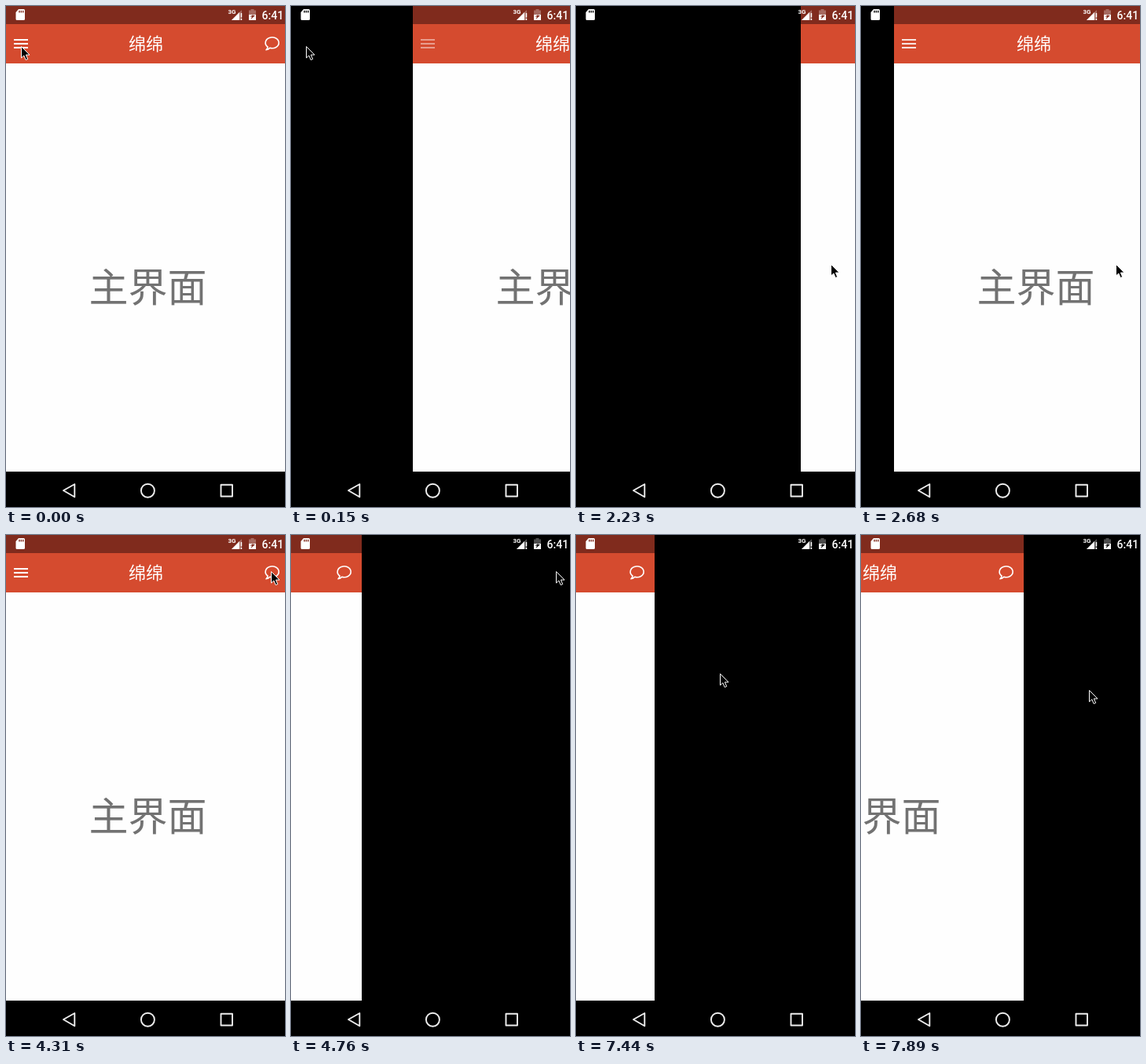
An HTML page for the animation above (8 s loop, 355 by 637 pixels).

```html
<!DOCTYPE html>
<html lang="zh-CN">
<head>
<meta charset="utf-8">
<title>Sliding panels</title>
<style>
  html, body { margin: 0; width: 100%; height: 100%; overflow: hidden; background: #000; }
  svg { display: block; width: 100vw; height: 100vh; }
  .cjk { font-family: "Noto Sans CJK SC", "Noto Sans CJK", sans-serif; text-anchor: middle; }
  .ui { font-family: Roboto, sans-serif; }
</style>
</head>
<body>
<svg viewBox="0 0 355 637">
  <rect width="355" height="637" fill="#000"/>

  <g id="page">
    <rect width="361" height="592" fill="#fefefe"/>
    <rect width="361" height="23" fill="#802b1d"/>
    <rect y="23" width="361" height="50" fill="#d54b2f"/>
    <path id="menu" d="M10 43H28M10 48H28M10 53H28" stroke="#fff" stroke-width="2"/>
    <text class="cjk" x="178" y="56" font-size="22" fill="#fff">绵绵</text>
    <g fill="none" stroke="#fff" stroke-width="1.6" stroke-linejoin="round">
      <path d="M333 52A8.500 7 0 1 1 335.600 53.300Q334 55.500 331 55.800Q332.800 54.500 333 52Z"/>
    </g>
    <text class="cjk" x="180.500" y="375.500" font-size="50" fill="#727272">主界面</text>
  </g>

  <g fill="#fff">
    <path fill-rule="evenodd" d="M16 4H22.500Q24 4 24 5.500V16.500Q24 18 22.500 18H14Q12.500 18 12.500 16.500V8ZM16.300 5.800V8.600H17.700V5.800ZM18.700 5.800V8.600H20.100V5.800ZM21.100 5.800V8.600H22.500V5.800Z"/>
    <text class="ui" x="282.500" y="10.200" font-size="8" font-weight="700">3G</text>
    <path d="M300 5V18H287Z" opacity=".3"/>
    <path d="M297 8V18H287Z"/>
    <path d="M298.700 9H300.200V14.500H298.700ZM298.700 16H300.200V18H298.700Z"/>
    <path d="M311.500 4H315.500V5.500H318V11H309V5.500H311.500Z" opacity=".3"/>
    <path fill-rule="evenodd" d="M309 11H318V18H309ZM314.500 11L310.500 13.500H313L311.500 17L317 12H314.500Z"/>
    <text class="ui" x="325.500" y="16.800" font-size="14" font-weight="500">6:41</text>
  </g>

  <g fill="none" stroke="#eee" stroke-width="1.900" stroke-linejoin="round">
    <path d="M73 616L87.300 608V624.300Z"/>
    <circle cx="180.400" cy="616.200" r="8.500"/>
    <rect x="273.500" y="608.700" width="14.500" height="14.800"/>
  </g>

  <path id="cursor" d="M0 0V14.500L3.300 11.500L5.700 17L8.200 16L5.900 10.600H10.500Z"
    fill="#000" stroke="#fff" stroke-width="1"/>
</svg>
<script>
  const LOOP = 8000, STEP = 148.8, OPEN = 286, SLIDE = 512;
  const GRIP = 158, GRIP_STEP = 48;
  const $ = id => document.getElementById(id);

  const settle = q => 1 - (1 - q) ** 3.2;
  const gather = q => q ** 1.3;
  const clamp = q => Math.min(1, Math.max(0, q));

  // Each pointer move bends towards `via` on its way to `to`; times are in steps.
  const start = [19, 51];
  const moves = [
    { from: 5, until: 13, via: [363, -15], to: [324, 328], ease: settle },
    { from: 19, until: 29, via: [334, 30], to: [337, 46], ease: settle },
    { from: 33, until: 35, via: [230, 50], to: [110, 57], ease: settle },
    { from: 36, until: 41, via: [20, 150], to: [173, 137], ease: settle },
    { from: 44, until: 53, via: [110, 175], to: [290, 197], ease: gather }
  ];

  function pointer(n) {
    let at = start;
    for (const { from, until, via, to, ease } of moves) {
      const p = ease(clamp((n - from) / (until - from)));
      at = at.map((a, i) => a * (1 - p) ** 2 + via[i] * 2 * p * (1 - p) + to[i] * p * p);
    }
    return at.map(Math.round);
  }

  const slide = (t, begin) => 1 - (1 - clamp((t - begin) / SLIDE)) ** 5;

  function offset(n, x) {
    if (n >= GRIP_STEP) return Math.max(0, x - GRIP) - OPEN;
    const t = n * STEP;
    return Math.round(OPEN * (slide(t, 75) - slide(t, 2515) - slide(t, 4535)));
  }

  function draw(time) {
    const n = Math.min(53, Math.floor((time % LOOP + 5) / STEP));
    const [x, y] = pointer(n);
    const dx = offset(n, x);
    $("page").setAttribute("transform", `translate(${dx} 0)`);
    $("menu").setAttribute("opacity", 1 - Math.max(0, dx) / OPEN);
    $("cursor").setAttribute("transform", `translate(${x + .5} ${y + .5})`);
  }

  let origin;
  function tick(now) {
    origin ??= now;
    draw(now - origin);
    requestAnimationFrame(tick);
  }
  draw(0);
  requestAnimationFrame(tick);
</script>
</body>
</html>
```
